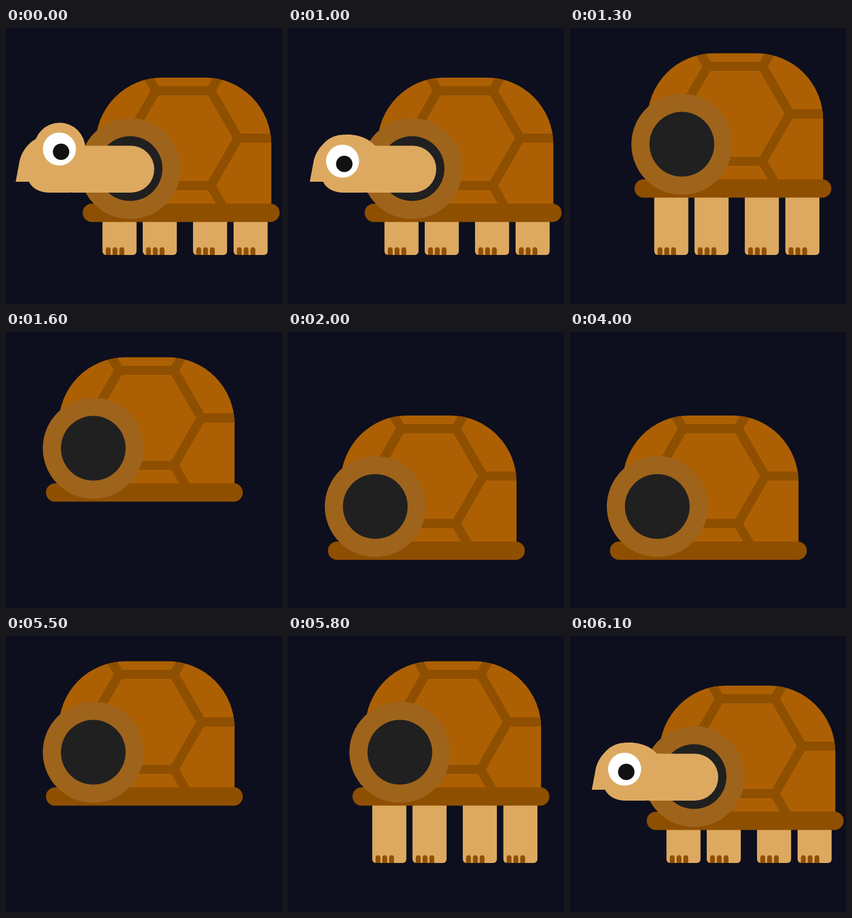
An HTML page that plays this animation: 456 by 456 pixels, repeating every 6200 ms.

```html
<!DOCTYPE html>
<html lang="en">
<head>
<meta charset="utf-8">
<title>Shy tortoise</title>
<style>
  html, body { margin: 0; width: 100%; height: 100%; overflow: hidden; background: #0d0f1e; }
  svg { display: block; width: 100%; height: 100%; }
  .skin { fill: #dda960; }
  .dark { fill: #8f4f00; }
  .white { fill: #fff; }
  .pupil { fill: #111; }
  .plates { fill: none; stroke: #8f4f00; stroke-width: 15.2; }
  #neck { stroke: #dda960; stroke-width: 77.5; stroke-linecap: round; }
</style>
</head>
<body>
<svg viewBox="0 0 456 456">
  <defs>
    <path id="dome" d="M148 300V192A110 110 0 0 1 258 82H328.4A110 110 0 0 1 438.4 192V300Z"/>
    <clipPath id="domeClip"><use href="#dome"/></clipPath>
    <g id="leg">
      <rect class="skin" y="262" width="56.3" height="113" rx="6"/>
      <path class="dark" d="M5.5 375v-8.8a4 4 0 0 1 8 0v8.8zm11.2 0v-8.8a4 4 0 0 1 8 0v8.8zm11.2 0v-8.8a4 4 0 0 1 8 0v8.8z"/>
    </g>
    <g id="peek">
      <circle class="white" r="22.7"/>
      <circle class="pupil" cx="2.3" cy="3.8" r="11.3"/>
    </g>
  </defs>

  <g id="legs">
    <use href="#leg" x="159.4"/>
    <use href="#leg" x="225.9"/>
    <use href="#leg" x="309"/>
    <use href="#leg" x="376"/>
  </g>

  <g id="shell">
    <use href="#dome" fill="#ad6003"/>
    <g clip-path="url(#domeClip)"><path class="plates" id="plates"/></g>
    <rect class="dark" x="126.8" y="290.2" width="325.2" height="30.3" rx="15.1"/>
    <circle cx="205" cy="232.3" r="83.4" fill="#9f641b"/>
    <circle cx="205" cy="232.3" r="53.5" fill="#202020"/>
    <g id="peeking">
      <use href="#peek" x="180" y="232.3"/>
      <use href="#peek" x="227.6" y="232.3"/>
    </g>
  </g>

  <g id="head">
    <line id="neck" x2="206.2" y1="233.3" y2="233.3"/>
    <path id="face" class="skin" d="M16 254L22 222C26 200 45 176 78 176C100 176 116 185 124 195L106 272H72C56 272 43 265 38 254Z"/>
    <g id="eye">
      <circle class="skin" cx="88.6" cy="199" r="42.4"/>
      <circle class="white" cx="88.2" cy="200" r="27.3"/>
      <circle class="pupil" cx="91" cy="204.5" r="13.6"/>
    </g>
  </g>
</svg>
<script>
  const $ = id => document.getElementById(id);
  const move = (id, x, y) => $(id).setAttribute('transform', `translate(${x} ${y})`);
  const show = (id, on) => $(id).setAttribute('visibility', on ? 'visible' : 'hidden');

  // Hexagon plate with a spoke out of every corner
  const corner = (i, r) => {
    const a = i * Math.PI / 3;
    return `${293 + r * Math.cos(a)} ${182 + r * Math.sin(a)}`;
  };
  const corners = [0, 1, 2, 3, 4, 5];
  $('plates').setAttribute('d',
    'M' + corners.map(i => corner(i, 90.6)).join('L') + 'Z' +
    corners.map(i => `M${corner(i, 90.6)}L${corner(i, 160)}`).join(''));

  const STEP = 100, STEPS = 62;
  const LEFT = -60.8, GROUND = 56;
  const rest = { x: 0, y: 0, head: 0, feet: 0 };
  const tuck = [
    { ...rest, head: 20 },
    { ...rest, head: 60 },
    { ...rest, head: 100 },
    { x: -20.2, y: -40.2, feet: 0 },
    { x: -40.5, y: -80, feet: -95 },
    { x: LEFT, y: -80 },
    { x: LEFT, y: -40.2 }
  ];
  const landed = { x: LEFT, y: GROUND };
  const drop = [{ x: LEFT, y: 0 }, { x: LEFT, y: 40 }, { ...landed, squash: true }];

  function poseAt(step) {
    if (step < 10) return rest;
    if (step < 17) return tuck[step - 10];
    if (step < 20) return drop[step - 17];
    if (step < 55) return { ...landed, peek: Math.floor(step / 5) % 2 === 1 };
    return tuck[61 - step];
  }

  function draw({ x, y, head, feet, squash, peek }) {
    move('shell', x, y);
    if (squash) {
      $('shell').setAttribute('transform',
        `translate(${x + 250} ${y + 320.5}) scale(1.039 .92) translate(-250 -320.5)`);
    }
    show('peeking', peek);

    show('legs', feet !== undefined);
    move('legs', x, feet || 0);

    show('head', head !== undefined);
    if (head !== undefined) {
      $('neck').setAttribute('x1', Math.min(110 + head, 206));
      move('face', head, 0);
      move('eye', head ? head - 18 : 0, head ? 20 : 0);
    }
  }

  const start = performance.now();
  function tick() {
    const t = performance.now() - start;
    draw(poseAt(Math.floor(t / STEP) % STEPS));
    requestAnimationFrame(tick);
  }
  tick();
</script>
</body>
</html>
```
